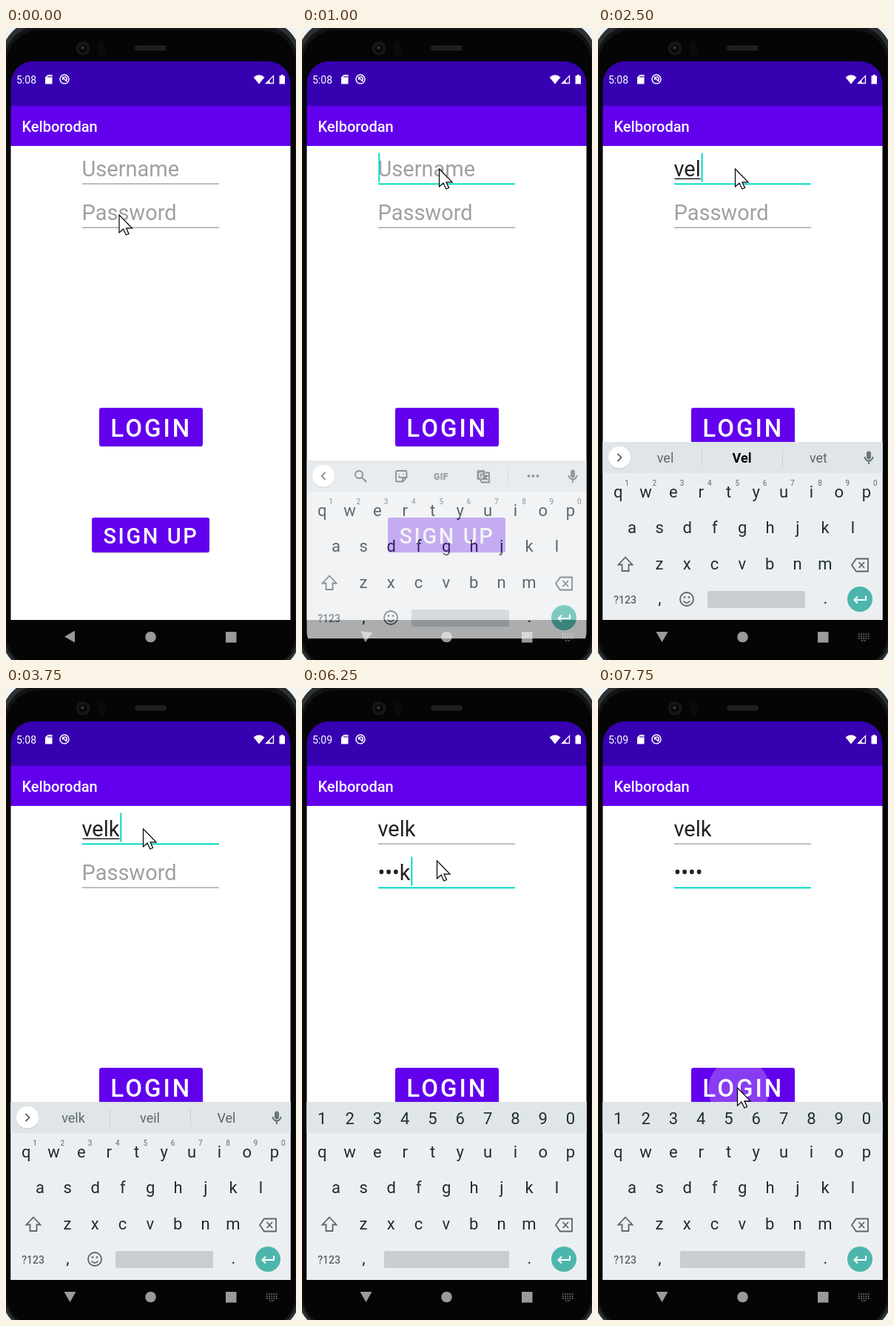
An HTML page for the animation above (8000 ms loop, 392 by 852 pixels).

```html
<!DOCTYPE html>
<html lang="en">
<head>
<meta charset="utf-8">
<title>Login screen</title>
<style>
  html, body { margin: 0; width: 100%; height: 100%; overflow: hidden; background: #eef3f4; }
  svg { display: block; width: 392px; height: 852px; font-family: Roboto, "Noto Sans", sans-serif; }
  .mid { text-anchor: middle; }
  .btn { fill: #6200ee; }
  .label { fill: #fff; font-weight: 500; }
  .field { font-size: 29px; }
  .nav { fill: #9a9a9a; }
  .key { font-size: 22px; fill: #1f2d33; text-anchor: middle; }
  .sup { font-size: 10px; fill: #5c6970; text-anchor: middle; }
  .word { font-size: 18px; fill: #5d676c; text-anchor: middle; }
  .word.best { fill: #000; font-weight: 700; }
  .line { fill: none; stroke: #5a666c; stroke-width: 1.8; }
  .solid { fill: #6b767b; }
</style>
</head>
<body>
<svg viewBox="0 0 392 852">
  <defs>
    <clipPath id="screen"><path d="M6.500 75A30 30 0 0 1 36.500 45H354.500A30 30 0 0 1 384.500 75V815A20 20 0 0 1 364.500 835H26.500A20 20 0 0 1 6.500 815Z"/></clipPath>
    <clipPath id="loginBox"><rect x="126" y="512" width="140" height="52" rx="3"/></clipPath>
  </defs>

  <!-- phone body -->
  <rect x="-6" y="-10" width="404" height="878" rx="50" fill="#2e2f30"/>
  <rect x="-2" y="-3" width="396" height="868" rx="47" fill="#121314"/>
  <rect x="1" y="3" width="390" height="859" rx="44" fill="#050506"/>
  <circle cx="104" cy="27.500" r="9.500" fill="#161718"/>
  <circle cx="104" cy="27.500" r="5.500" fill="#0a0a0b"/>
  <circle cx="103.500" cy="26.500" r="2" fill="#3b3d40"/>
  <rect x="124" y="18" width="10" height="20" rx="5" fill="#0b0b0c"/>
  <rect x="174.500" y="23.500" width="42" height="7" rx="3" fill="#232323"/>
  <path d="M177 27H214" stroke="#161616" stroke-width="3" stroke-dasharray="1 1"/>

  <g clip-path="url(#screen)">
    <rect x="6" y="159" width="379" height="639" fill="#fff"/>
    <rect x="6" y="45" width="379" height="60" fill="#3700b0"/>
    <rect x="6" y="105" width="379" height="54" fill="#6200ee"/>
    <text class="label" x="21.500" y="140" font-size="20">Kelborodan</text>

    <!-- status bar -->
    <g fill="#fff">
      <text id="clock" x="14" y="74.500" font-size="14"></text>
      <path d="M56.500 63H62.500V75.500H53V66.500Z"/>
      <path d="M57 64.500V67M59 64.500V67M61 64.500V67" stroke="#3700b0"/>
      <circle cx="79" cy="69" r="6" fill="none" stroke="#fff" stroke-width="1.500"/>
      <path d="M76 66L82 72M77 70A2.800 2.800 0 1 1 80 71.500" fill="none" stroke="#fff" stroke-width="1.500"/>
      <path d="M334.500 66.500Q342 60 349.500 66.500L342 75.500Z"/>
      <path d="M351.500 74.500H361.500V64.500Z" fill="none" stroke="#fff" stroke-width="1.300"/>
      <path d="M356.500 74.500V70L351.500 74.500Z"/>
      <path d="M369.500 64.500H371.500V63H375V64.500H377V75.500H369.500Z"/>
    </g>

    <!-- form -->
    <g id="form"></g>
    <rect x="126" y="513" width="140" height="52" rx="3" fill="#000" opacity=".12"/>
    <rect class="btn" x="126" y="512" width="140" height="52" rx="3"/>
    <circle id="ripple" cx="190.500" cy="541" r="41.500" fill="#fff" opacity=".24" clip-path="url(#loginBox)"/>
    <text class="label" x="141.300" y="551" font-size="33" letter-spacing="3">LOGIN</text>
    <rect x="116" y="661" width="159" height="47" rx="3" fill="#000" opacity=".12"/>
    <rect class="btn" x="116" y="660" width="159" height="47" rx="3"/>
    <text class="label" x="131.500" y="695" font-size="29" letter-spacing="2.600">SIGN UP</text>

    <!-- navigation bar -->
    <rect x="6" y="798" width="379" height="37" fill="#050506"/>
    <path id="back" class="nav" d="M-7.500 0L6.500 -8V8Z"/>
    <circle class="nav" cx="195.500" cy="821" r="7.300"/>
    <rect class="nav" x="297" y="814" width="14.500" height="14.500"/>
    <path id="switch" d="M352 817H367M352 820H367M352 823H367M356 826H363" stroke="#777" stroke-width="1.600" stroke-dasharray="1.800 1.400"/>

    <!-- keyboard -->
    <g id="kb">
      <rect x="6" y="558" width="379" height="240" fill="#eceff1"/>
      <rect x="6" y="558" width="379" height="42" fill="#e0e5e8"/>
      <g id="bar">
        <circle cx="29" cy="580" r="15" fill="#b9c0c4"/>
        <circle cx="29" cy="579" r="15" fill="#fff"/>
        <path id="chevron" class="line" d="M-2.500 -5L2.500 0L-2.500 5"/>
        <rect class="solid" x="363" y="570.500" width="6" height="11" rx="3"/>
        <path class="line" d="M360.500 578A5.500 5.500 0 0 0 371.500 578M366 583.500V588"/>
      </g>
      <g id="tools">
        <circle class="line" cx="77" cy="577" r="5"/>
        <path class="line" d="M81 581L87 587"/>
        <path class="line" d="M129 572H139.500Q141.500 572 141.500 574V581L136 586.500H129Q127 586.500 127 584.500V574Q127 572 129 572ZM141 581H136V586M130.500 579Q132 582 135 580.500M131 576V577M137 576V577"/>
        <text class="mid solid" x="188" y="583.500" font-size="12" font-weight="900" letter-spacing=".5">GIF</text>
        <rect class="solid" x="236.500" y="571" width="11" height="13" rx="1.500"/>
        <text class="mid" x="242" y="581.500" font-size="10" font-weight="700" fill="#e0e5e8">G</text>
        <path class="line" d="M248 574.500H253V587.500H243L241 584M246 579H252M249 577.500V579Q248.500 583 245.500 584.500M247 580.500L251 584.500"/>
        <path d="M278.500 569V590" stroke="#c8ced1"/>
        <g class="solid"><circle cx="306.500" cy="579" r="2"/><circle cx="312.500" cy="579" r="2"/><circle cx="318.500" cy="579" r="2"/></g>
      </g>
      <g id="words">
        <path d="M140.500 568V591M249.500 568V591" stroke="#c8ced1"/>
      </g>
      <g id="digits"></g>
      <g id="sups"></g>
      <g id="keys"></g>
      <path class="line" d="M37 713.500L46.500 723.500H41.500V732H32.500V723.500H27.500Z"/>
      <path class="line" d="M349 715.500H365V732.500H349L343 724ZM352.500 720L360 728M360 720L352.500 728"/>
      <text class="mid" x="36.500" y="775.500" font-size="14" font-weight="500" fill="#5a666c">?123</text>
      <g id="smile">
        <circle class="line" cx="120" cy="770" r="9"/>
        <path class="line" d="M115.500 772.500Q120 777.500 124.500 772.500"/>
        <circle class="solid" cx="117" cy="767.500" r="1.400"/><circle class="solid" cx="123" cy="767.500" r="1.400"/>
      </g>
      <rect id="space" y="759" height="23" rx="2" fill="#c8cdd0"/>
      <circle cx="354" cy="770" r="17" fill="#4db6ac"/>
      <path d="M362 765.500V771H347M351 766.500L346.500 771L351 775.500" fill="none" stroke="#fff" stroke-width="2"/>
    </g>
  </g>

  <path id="mouse" d="M0 0V24L5.500 19L9.300 27L13 25.500L9.500 17.800H17.500Z" fill="#fff" stroke="#000" stroke-width="1.200"/>
</svg>
<script>
const LOOP = 8000, STEP = 250;
const $ = id => document.getElementById(id);

function add(parent, tag, attrs, text = "") {
  const el = document.createElementNS("http://www.w3.org/2000/svg", tag);
  for (const k in attrs) el.setAttribute(k, attrs[k]);
  el.textContent = text;
  return parent.appendChild(el);
}
const show = (el, on) => { el.style.display = on ? "" : "none"; };
const place = (el, x, y, turn = 0) =>
  el.setAttribute("transform", `translate(${x} ${y}) rotate(${turn})`);

// Keys
const PITCH = 37.3;
function row(group, chars, x, y, cls = "key") {
  [...chars].forEach((c, i) => add(group, "text", { class: cls, x: x + i * PITCH, y }, c));
}
row($("digits"), "1234567890", 27.3, 588);
row($("sups"), "1234567890", 39, 617, "sup");
row($("keys"), "qwertyuiop", 27.3, 632.5);
row($("keys"), "asdfghjkl", 46, 680.5);
row($("keys"), "zxcvbnm", 83, 729.5);
add($("keys"), "text", { class: "key", x: 83.5, y: 776 }, ",");
add($("keys"), "text", { class: "key", x: 307.5, y: 776 }, ".");
const words = [91, 194.5, 298].map(x => add($("words"), "text", { class: "word", x, y: 586 }));

// Input fields
function makeField(hint, y) {
  const form = $("form"), left = 102.5;
  const text = add(form, "text", { class: "field", x: left, y });
  const under = add(form, "rect", { x: 103.5, y: y + 2.5, height: 1.5, fill: "#212121" });
  const rule = add(form, "rect", { x: 103, width: 185 });
  const caret = add(form, "rect", { y: y - 31.5, width: 2, height: 39, fill: "#03dac5" });
  return (value, focused, caretOn, composing) => {
    text.textContent = value || hint;
    text.setAttribute("fill", value ? "#212121" : "#a0a0a0");
    const width = value ? text.getComputedTextLength() : 0;
    under.setAttribute("width", Math.max(0, width - 1));
    show(under, composing && value);
    rule.setAttribute("fill", focused ? "#03dac5" : "#8c8c8c");
    rule.setAttribute("y", focused ? y + 9.3 : y + 9.5);
    rule.setAttribute("height", focused ? 2 : 1.1);
    caret.setAttribute("x", left + 0.8 + width);
    show(caret, focused && caretOn);
  };
}
const drawUser = makeField("Username", 200);
const drawPass = makeField("Password", 259);

// Each entry changes part of the state from its time on
const timeline = [
  [0, { clock: "5:08", user: "", pass: "", focus: "", caret: false, kb: "", words: [], best: -1, ripple: false, mouse: [153, 252] }],
  [250, { mouse: [165, 229] }],
  [500, { mouse: [185.5, 190] }],
  [750, { focus: "user", caret: true }],
  [1000, { kb: "slide" }],
  [1250, { kb: "tools" }],
  [1500, { caret: false }],
  [1750, { caret: true }],
  [2250, { user: "ve", kb: "words", words: ["ve", "very", "vet"] }],
  [2500, { user: "vel", words: ["vel", "Vel", "vet"], best: 1 }],
  [2750, { user: "velk", words: ["velk", "veil", "Vel"], best: -1 }],
  [3250, { caret: false }],
  [3750, { caret: true }],
  [4000, { mouse: [184, 211] }],
  [4250, { mouse: [182.5, 233] }],
  [4500, { focus: "pass" }],
  [4750, { kb: "digits" }],
  [5000, { clock: "5:09", caret: false }],
  [5500, { pass: "v", caret: true }],
  [5750, { pass: "•e" }],
  [6000, { pass: "••l" }],
  [6250, { pass: "•••k" }],
  [6750, { caret: false }],
  [7250, { caret: true, mouse: [184, 318] }],
  [7500, { mouse: [188.5, 510] }],
  [7750, { pass: "••••", caret: false, mouse: [188.5, 539], ripple: true }]
];

function draw(t) {
  const s = Object.assign({}, ...timeline.filter(e => e[0] <= t).map(e => e[1]));
  const { kb } = s, sliding = kb === "slide", digits = kb === "digits";

  $("clock").textContent = s.clock;
  drawUser(s.user, s.focus === "user", s.caret, s.focus === "user");
  drawPass(s.pass, s.focus === "pass", s.caret, false);
  show($("ripple"), s.ripple);
  place($("mouse"), ...s.mouse);

  place($("back"), 86.5, 820.5, kb ? (sliding ? -82 : -90) : 0);
  show($("switch"), kb);

  show($("kb"), kb);
  place($("kb"), 0, sliding ? 25 : 0);
  $("kb").setAttribute("opacity", sliding ? 0.72 : 1);
  show($("bar"), !digits);
  show($("tools"), sliding || kb === "tools");
  show($("words"), kb === "words");
  show($("digits"), digits);
  show($("sups"), !digits);
  show($("smile"), !digits);
  $("space").setAttribute("x", digits ? 111 : 148);
  $("space").setAttribute("width", digits ? 169 : 132);
  place($("chevron"), 29, 579, kb === "words" ? 0 : 180);
  words.forEach((w, i) => {
    w.textContent = s.words[i] || "";
    w.classList.toggle("best", i === s.best);
  });
}

const start = performance.now();
let last = -1;
function tick() {
  const t = Math.floor((performance.now() - start) % LOOP / STEP) * STEP;
  if (t !== last) draw(last = t);
  requestAnimationFrame(tick);
}
tick();
</script>
</body>
</html>
```
